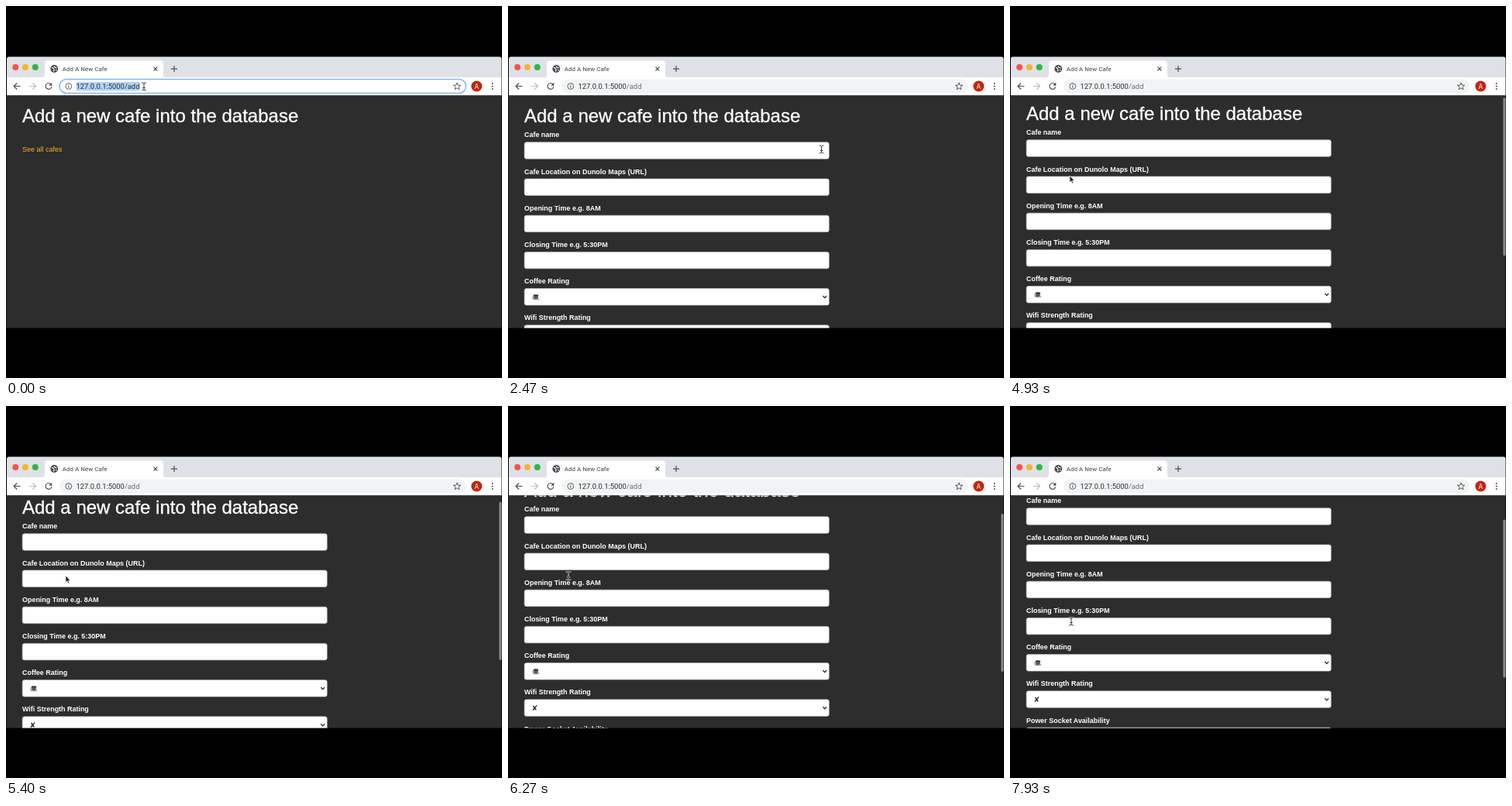
Animation of 640 by 480 pixels, one loop 8000 ms. Source, as an HTML page:

```html
<!DOCTYPE html>
<html lang="en">
<head>
<meta charset="utf-8">
<title>Add A New Cafe</title>
<style>
  html, body { margin: 0; width: 100%; height: 100%; overflow: hidden; background: #000; }
  svg { display: block; }
  .ui { font-family: Roboto, "Liberation Sans", sans-serif; }
  .page { font-family: "Liberation Sans", Arial, sans-serif; }
  .line { fill: none; stroke: #4a4d51; stroke-width: 1.2; }
  .label { font-size: 8.95px; font-weight: bold; fill: #fff; }
  .field { fill: #fff; stroke: #c4c4c4; stroke-width: .7; }
</style>
</head>
<body>
<svg width="640" height="480" viewBox="0 0 640 480">
  <rect width="640" height="480" fill="#000"/>

  <g class="ui">
    <path d="M1 92.5V68.500q0-3 3-3H636.500q3 0 3 3V92.500z" fill="#dee1e6"/>
    <rect x="1" y="92" width="638.500" height="23.500" fill="#fff"/>
    <path d="M46 92.500q4 0 4-4V75q0-4.500 4.500-4.500H198.500q4.500 0 4.500 4.500V88.500q0 4 4 4z" fill="#fff"/>
    <circle cx="12.200" cy="79" r="4" fill="#fc504b"/>
    <circle cx="25" cy="79" r="4" fill="#f7b52c"/>
    <circle cx="37.800" cy="79" r="4" fill="#2cb942"/>

    <circle cx="62.300" cy="81" r="4.900" fill="#44474b"/>
    <path d="M59 79.300l2.200 1.200 1 2.300-1.200 1.500M62 77.500l1 1.700 2.600.6M64 82.700l1.800.3" fill="none" stroke="#fff" stroke-width="1.200"/>
    <text x="72.800" y="84" font-size="8" fill="#3c4043">Add A New Cafe</text>
    <path class="line" d="M190.500 78.700l4.800 4.800m0-4.800l-4.800 4.800M213 81.100h8M217 77.100v8"/>

    <path class="line" d="M18.500 103.500H10.200m4-4l-4 4 4 4"/>
    <path class="line" d="M30.200 103.500h8.300m-4-4l4 4-4 4" style="stroke:#b9bbbe"/>
    <path class="line" d="M58 100.900a3.900 3.900 0 1 0 .8 3.400"/>
    <path d="M59.300 98.800v4h-4z" fill="#4a4d51"/>

    <rect id="pill" x="69" y="94.500" width="524.500" height="18" rx="9"/>
    <rect id="mark" x="90.500" y="98" width="82" height="11.500" fill="#b3d3f7"/>
    <circle class="line" cx="80.800" cy="103.500" r="3.900" style="stroke-width:.9"/>
    <path d="M80.800 103v2.600M80.800 101.200v1" stroke="#4a4d51"/>
    <text x="90.500" y="106.800" font-size="9.400" fill="#2b2d30">127.0.0.1:5000<tspan id="path">/add</tspan></text>

    <path id="star" class="line" style="stroke-width:.9"/>
    <circle cx="607.300" cy="103.500" r="7" fill="#c2280e"/>
    <text x="607.300" y="106.600" font-size="8.500" fill="#fff" text-anchor="middle">A</text>
    <g fill="#4a4d51">
      <circle cx="627.700" cy="100" r="1"/>
      <circle cx="627.700" cy="103.500" r="1"/>
      <circle cx="627.700" cy="107" r="1"/>
    </g>
  </g>

  <svg class="page" x="0" y="115.500" width="640" height="300" viewBox="0 115.500 640 300">
    <rect x="0.500" y="115" width="639" height="301" fill="#2d2d2d"/>
    <g id="content">
      <text x="21" y="150" font-size="24" fill="#fff" stroke="#fff" stroke-width=".35">Add a new cafe into the database</text>
      <text id="link" x="21" y="188.300" font-size="9" fill="#f7ae2b">See all cafes</text>
      <g id="form"></g>
    </g>
    <rect id="bar" x="636.300" width="3.200" height="204" rx="1.600" fill="#878787"/>
  </svg>

  <g id="cursor">
    <g id="beam" fill="none" stroke-linecap="round">
      <path d="M-2.500-5Q0-5 0-3.500Q0-5 2.500-5M0-3.500V3.500M-2.500 5Q0 5 0 3.500Q0 5 2.500 5M-1.300 1.500H1.300" stroke="#fff" stroke-opacity=".75" stroke-width="2"/>
      <path d="M-2.500-5Q0-5 0-3.500Q0-5 2.500-5M0-3.500V3.500M-2.500 5Q0 5 0 3.500Q0 5 2.500 5M-1.300 1.500H1.300" stroke="#333" stroke-width=".95"/>
    </g>
    <path id="arrow" d="M0 0V8.400L1.900 6.700 3.200 9.800 4.700 9.200 3.400 6.200H6z" fill="#111" stroke="#e8e8e8" stroke-width=".8" stroke-linejoin="round"/>
  </g>
</svg>

<script>
const $ = id => document.getElementById(id);
const LOOP = 8000, FPS = 15;
const ROW = 47.2, FIELD_TOP = 175.8, FIELD_H = 21.4;

const labels = [
  "Cafe name", "Cafe Location on Dunolo Maps (URL)", "Opening Time e.g. 8AM",
  "Closing Time e.g. 5:30PM", "Coffee Rating", "Wifi Strength Rating",
  "Power Socket Availability"
];

const cup = y => `<g transform="translate(36 ${y})">
  <ellipse cy="2.600" rx="4.500" ry="1.400" fill="#aaa"/>
  <path d="M-3-1.800H3Q3 3 0 3T-3-1.800z" fill="#555"/>
  <ellipse cy="-1.800" rx="3.200" ry="1.300" fill="#4a2c1e" stroke="#777" stroke-width=".5"/>
  <path d="M-3-.5q-2 0-1.600 1.200T-2 1.700" fill="none" stroke="#666" stroke-width=".7"/></g>`;
const cross = y => `<text x="30.500" y="${y + 3.500}" font-size="9.500" fill="#333" font-family="DejaVu Sans, sans-serif">✘</text>`;

$("form").innerHTML = labels.map((text, i) => {
  const top = FIELD_TOP + i * ROW, mid = top + FIELD_H / 2;
  const choice = i < 4 ? "" : (i === 4 ? cup(mid) : cross(mid)) +
    `<path d="M406.300 ${mid - 1.200}l2.400 2.400 2.400-2.400" fill="none" stroke="#333" stroke-width="1.400"/>`;
  return `<text class="label" x="21" y="${169.3 + i * ROW}">${text}</text>
    <rect class="field" x="21.200" y="${top}" width="393" height="${FIELD_H}" rx="2.500"/>${choice}`;
}).join("");

$("star").setAttribute("d", "M" + Array.from({ length: 10 }, (_, i) => {
  const r = i % 2 ? 2.1 : 4.9, a = i * Math.PI / 5;
  return `${(582 + r * Math.sin(a)).toFixed(2)} ${(103.8 - r * Math.cos(a)).toFixed(2)}`;
}).join("L") + "z");

// Steps of 1/15 s: [step, x, y]
const moves = [
  [20, 178, 104], [23, 122, 86], [26, 68, 112], [29, 190, 158], [33, 386, 179], [37, 404.500, 185],
  [39, 404.500, 185], [42, 300, 320], [45, 130, 379], [48, 48, 318], [52, 44, 168],
  [55, 282, 161], [57, 333, 195], [60, 240, 302], [62, 110, 270], [64, 46, 182],
  [65, 46, 182], [71, 77, 219], [89, 77, 219], [90, 78, 219],
  [102, 78, 219], [106, 81, 244], [111, 81, 244], [113, 84, 260], [115, 79, 278]
];
// [step, offset]
const scrolls = [
  [73, 0], [75, 6], [78, 6], [79, 9], [80, 9], [81, 11], [82, 11], [83, 13], [89, 13],
  [94, 33], [101, 37], [102, 37], [106, 38.500], [108, 38.500], [110, 43.500], [117, 43.500], [118, 44]
];

function at(keys, step) {
  const n = keys.findIndex(k => k[0] > step);
  if (n === 0) return keys[0].slice(1);
  if (n < 0) return keys[keys.length - 1].slice(1);
  const a = keys[n - 1], b = keys[n], p = (step - a[0]) / (b[0] - a[0]);
  return a.slice(1).map((v, i) => v + (b[i + 1] - v) * p);
}

const inPill = (x, y) => x > 69 && x < 594 && y > 94 && y < 113;

function isBeam(step, x, y) {
  if (step >= 72) return step >= 90;
  if (inPill(x, y)) return true;
  if (x < 21 || x > 414) return false;
  if (y > 131 && y < 155 && x < 377) return true;
  const row = Math.floor((y - FIELD_TOP) / ROW);
  return row >= 0 && row < 4 && (y - FIELD_TOP) % ROW < FIELD_H;
}

const show = (id, on) => $(id).setAttribute("visibility", on ? "visible" : "hidden");

function draw(ms) {
  const step = Math.floor((ms % LOOP + 4) * FPS / 1000) % (LOOP * FPS / 1000);
  const [x, y] = at(moves, step), [offset] = at(scrolls, step);
  const focused = step < 6, loaded = step >= 7, beam = isBeam(step, x, y);

  const pill = $("pill");
  pill.setAttribute("fill", focused ? "#fff" : inPill(x, y) ? "#e9ebee" : "#f1f3f4");
  pill.setAttribute("stroke", focused ? "#85b5ee" : "none");
  pill.setAttribute("stroke-width", 1.5);
  $("path").setAttribute("fill", focused ? "#2b2d30" : "#6a6e73");
  show("mark", focused);
  show("link", !loaded);
  show("form", loaded);
  show("bar", offset > 0);
  show("beam", beam);
  show("arrow", !beam);
  $("content").setAttribute("transform", `translate(0 ${-offset})`);
  $("bar").setAttribute("y", 116.2 + offset * 0.69);
  $("cursor").setAttribute("transform", `translate(${x} ${y})`);
}

const start = performance.now();
function tick() {
  draw(performance.now() - start);
  requestAnimationFrame(tick);
}
tick();
</script>
</body>
</html>
```
